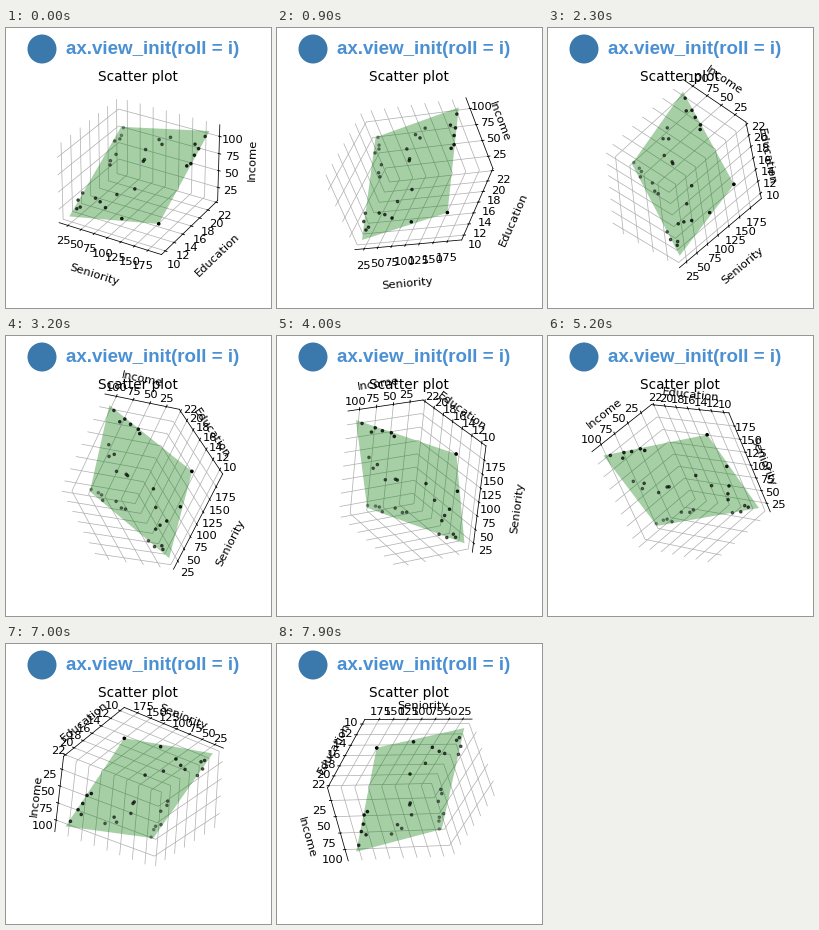
A matplotlib script for the animation above (8000 ms loop, 265x280 px).

```python
import matplotlib.pyplot as plt
import numpy as np
from matplotlib.animation import FuncAnimation
from matplotlib.patches import Circle

W, H, DPI = 265, 280, 80
FRAMES, STEP_MS, ROLL_STEP = 80, 100, 2.5

plt.rcParams.update({"font.family": "DejaVu Sans", "font.size": 10.3,
                     "grid.linewidth": 0.65})

EDU_MIN, EDU_MAX = 10, 21.586
SEN_MIN, SEN_MAX = 20, 187.586


def plane(sen, edu):
    """Fitted income for seniority and education."""
    return -50.09 + 5.896 * edu + 0.1729 * sen


def sample(seed=4):
    """Points on three seniority strands, waving about the fitted plane."""
    rng = np.random.default_rng(seed)
    i = np.arange(1, 30)
    edu = EDU_MIN + np.interp(i, [0, 7, 10, 11, 16, 29],
                              [0, 2.1, 4.6, 6.6, 7.4, EDU_MAX - EDU_MIN])
    strand = np.choose(i % 3, [SEN_MAX, 107, 32]) - SEN_MIN
    spread = np.where((i > 2) & (i < 10), 0.3, 1)
    sen = SEN_MIN + strand * spread + rng.uniform(-18, 12, i.size)
    sen = np.clip(sen, SEN_MIN, SEN_MAX)
    wave = 6 * np.cos(2 * np.pi * (edu - 10.4) / 7.9)
    income = plane(sen, edu) + wave + rng.normal(0, 3, i.size)
    # The nearest point sits on the plane's front corner
    corner = SEN_MAX, EDU_MIN, plane(SEN_MAX, EDU_MIN) + 0.3
    return [np.append(v, c) for v, c in zip((sen, edu, income), corner)]


fig = plt.figure(figsize=(W / DPI, H / DPI), dpi=DPI, facecolor="white")


def put_text(x, y, text, **style):
    """Place text with its baseline at pixel (x, y) from the top left."""
    fig.text(x / W, 1 - y / H, text, va="baseline", **style)


# Header
fig.add_artist(Circle((36, H - 21), 14.5, transform=None, color="#3b78ab", lw=0))
put_text(60.3, 26, "ax.view_init(roll = i)", color="#4a90d2", weight="bold",
         family="Liberation Sans", size=16.9)
put_text(132.2, 52.5, "Scatter plot", ha="center", size=12.3)

# 3D axes, placed so the cube turns about (CX, CY)
CX, CY, SIDE = 133.3, 145.8, 296
left = CX - SIDE * 0.095 / 0.185
bottom = H - CY - SIDE * 0.095 / 0.185
ax = fig.add_axes([left / W, bottom / H, SIDE / W, SIDE / H], projection="3d")
ax.patch.set_visible(False)
ax.set_box_aspect((4, 4, 3), zoom=0.6175)

ax.scatter(*sample(), c="black", s=5)
gx, gy = np.meshgrid([SEN_MIN, SEN_MAX], [EDU_MIN, EDU_MAX])
ax.plot_surface(gx, gy, plane(gx, gy), color=(0, 0.47, 0),
                alpha=0.35, shade=False, linewidth=0)

ax.set_xticks(range(25, 176, 25))
ax.set_yticks(range(10, 23, 2))
ax.set_zticks(range(25, 101, 25))
ax.set_xlabel("\nSeniority", linespacing=3)
ax.set_ylabel("\nEducation", linespacing=3)
ax.set_zlabel("\nIncome")
for axis in (ax.xaxis, ax.yaxis, ax.zaxis):
    axis.set_pane_color((1, 1, 1, 0))
    axis.line.set_linewidth(0.7)


def update(i):
    ax.view_init(elev=30, azim=-60, roll=ROLL_STEP * i)
    return []


anim = FuncAnimation(fig, update, frames=FRAMES, interval=STEP_MS,
                     repeat=True, repeat_delay=0, blit=False)
plt.show()
```
